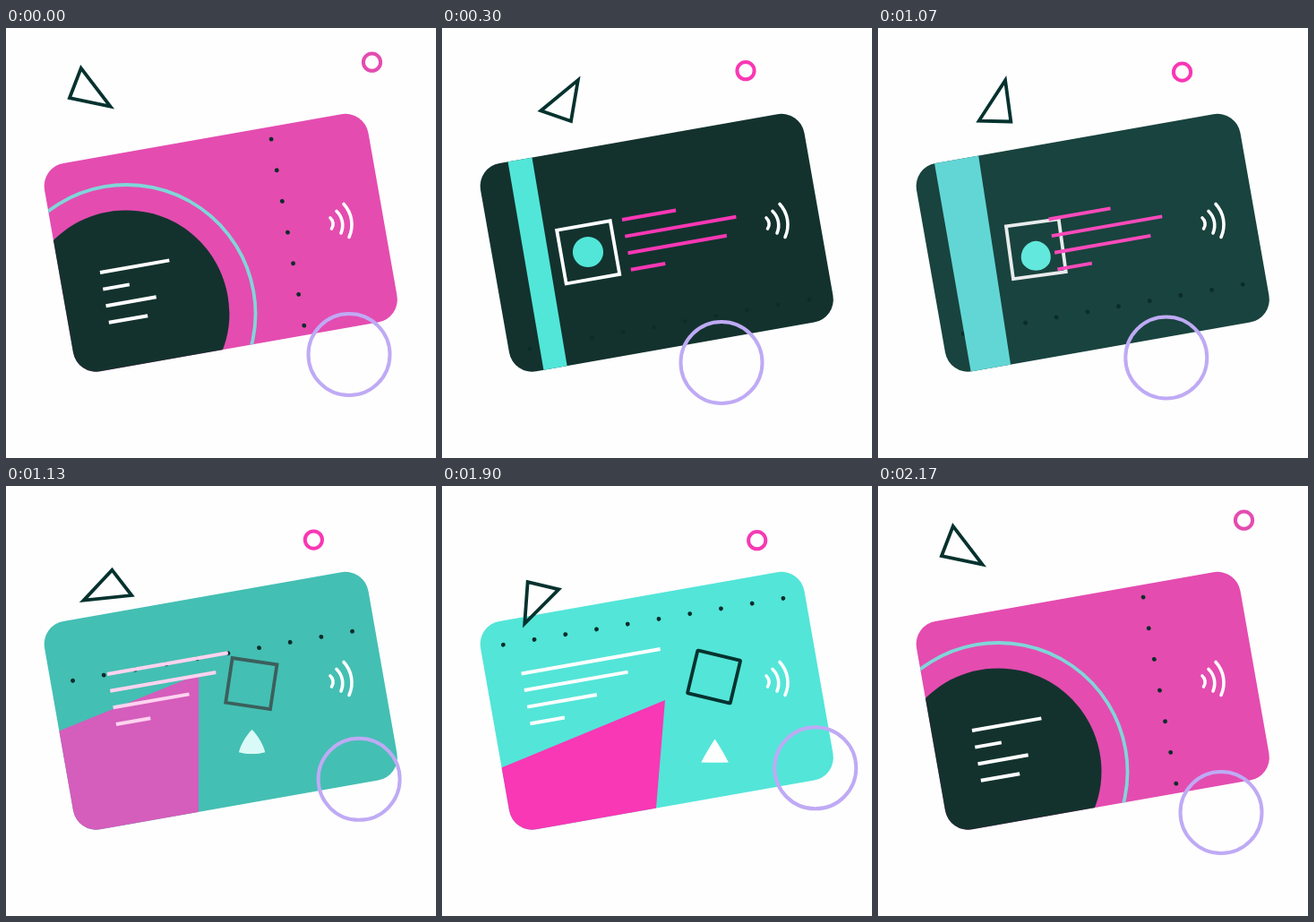
An HTML page with a canvas that plays this animation: 480 by 480 pixels, repeating every 2.76 s.

```html
<!DOCTYPE html>
<html lang="en">
<head>
<meta charset="utf-8">
<title>Card designs</title>
<style>
html, body { margin: 0; width: 100%; height: 100%; overflow: hidden; background: #fefefe; }
canvas { display: block; width: 480px; height: 480px; }
</style>
</head>
<body>
<canvas id="stage" width="480" height="480"></canvas>
<script>
const ctx = document.getElementById('stage').getContext('2d');
const LOOP = 2760, FPS = 30, STEPS = 9;
const TILT = -10 * Math.PI / 180;

const PINK = [249, 55, 180, 1], ROSE = [228, 76, 176, 1], DARK = [19, 50, 46, 1];
const TEAL = [82, 230, 216, 1], WHITE = [255, 255, 255, 1], SKY = [128, 214, 216, 1];
const INK = [4, 50, 46, 1];

// Outline of three curved sides: [corner, handle, handle] per side
const blob = (corners, handles) => corners.map((p, i) => {
  const q = corners[(i + 1) % 3];
  return [p, ...handles(p, q)];
});
const disc = r => blob(
  [[0, -r], [r * 0.866, r / 2], [-r * 0.866, r / 2]],
  (p, q) => [[p[0] - 0.77 * p[1], p[1] + 0.77 * p[0]], [q[0] + 0.77 * q[1], q[1] - 0.77 * q[0]]]);
const wedge = blob(
  [[0, -14], [14.7, 11], [-14.7, 11]],
  (p, q) => [mix(p, q, 1 / 3), mix(p, q, 2 / 3)]);

const slope = [[-10, 346], [249, 239], [234, 420], [20, 460]];
const stripe = [[67, 111], [94, 106], [146, 415], [120, 420]];

const designs = [
  {
    card: ROSE,
    dots: { at: [323.6, 280.1], angle: 80 },
    panel: { points: slope, color: [249, 55, 180, 0] },
    badge: { at: [134.3, 318.5], shape: disc(115), color: DARK },
    frame: { at: [134.5, 319], angle: -10, size: 288, radius: 144, color: SKY },
    lines: { at: [105, 273], lengths: [78.5, 30, 57, 44], color: WHITE },
    triangle: { at: [95.3, 68.7], angle: 11.8 },
    ring: { at: [408.5, 38.2], color: ROSE },
    hoop: [383, 364.5]
  },
  {
    card: DARK,
    dots: { at: [254, 330.5], angle: -10 },
    panel: { points: stripe, color: TEAL },
    badge: { at: [163, 250], shape: disc(17), color: TEAL },
    frame: { at: [163.2, 250.3], angle: -10, size: 60.5, radius: 0, color: WHITE },
    lines: { at: [201, 214], lengths: [61, 126, 112, 39], color: PINK },
    triangle: { at: [133.8, 80], angle: -80.3 },
    ring: { at: [339, 47.7], color: PINK },
    hoop: [312, 373.5]
  },
  {
    card: TEAL,
    dots: { at: [224, 150.5], angle: -10 },
    panel: { points: slope, color: PINK },
    badge: { at: [305.7, 297], shape: wedge, color: WHITE },
    frame: { at: [304.7, 212.3], angle: 13.7, size: 47.5, radius: 0, color: INK },
    lines: { at: [88.5, 209], lengths: [158, 118, 79, 39], color: WHITE },
    triangle: { at: [108.2, 130.4], angle: -267.7 },
    ring: { at: [344.6, 63.5], color: PINK },
    hoop: [417, 314.5]
  }
];
const starts = [0, 29, 56];

// Blends numbers, arrays and objects alike
function mix(a, b, p) {
  if (typeof a === 'number') return a + (b - a) * p;
  if (Array.isArray(a)) return a.map((v, i) => mix(v, b[i], p));
  return Object.fromEntries(Object.keys(a).map(k => [k, mix(a[k], b[k], p)]));
}

function ease(x) {
  const bezier = (u, a, b) => 3 * u * (1 - u) ** 2 * a + 3 * u * u * (1 - u) * b + u ** 3;
  let lo = 0, hi = 1;
  for (let i = 0; i < 30; i++) {
    const mid = (lo + hi) / 2;
    if (bezier(mid, 0.85, 0.12) < x) lo = mid; else hi = mid;
  }
  return bezier(lo, 0, 1);
}

const css = c => `rgba(${c.slice(0, 3).map(Math.round)},${c[3]})`;

function fill(path, color) {
  ctx.fillStyle = css(color);
  ctx.fill(path);
}

function stroke(path, color, width = 4) {
  ctx.strokeStyle = css(color);
  ctx.lineWidth = width;
  ctx.stroke(path);
}

function place(at, angle, draw) {
  ctx.save();
  ctx.translate(...at);
  ctx.rotate(angle);
  draw();
  ctx.restore();
}

const rad = deg => deg * Math.PI / 180;

function polygon(points) {
  const path = new Path2D();
  points.forEach(p => path.lineTo(...p));
  path.closePath();
  return path;
}

function circle(x, y, r) {
  const path = new Path2D();
  path.arc(x, y, r, 0, 2 * Math.PI);
  return path;
}

function box(w, h, r) {
  const path = new Path2D();
  path.roundRect(-w / 2, -h / 2, w, h, r);
  return path;
}

const waves = new Path2D('M362 212A9 9 0 0 1 363.5 224M369 204.5A22 22 0 0 1 374 229M377 196.5A34 34 0 0 1 383 233.5');
const outline = polygon([[-21.9, 14.1], [-16.2, -21.1], [24.6, 14.1]]);
const cardShape = box(367, 236, 26);

function drawCard(s) {
  fill(cardShape, s.card);
  ctx.clip(cardShape);
  ctx.rotate(-TILT);
  ctx.translate(-239.75, -239.75);

  place(s.dots.at, rad(s.dots.angle), () => {
    for (let i = 0; i < 10; i++) fill(circle((i - 4.5) * 35.2, 0, 2.4), [10, 45, 42, 1]);
  });
  fill(polygon(s.panel.points), s.panel.color);

  place(s.badge.at, 0, () => {
    const path = new Path2D(), sides = s.badge.shape;
    path.moveTo(...sides[0][0]);
    sides.forEach(([, a, b], i) => path.bezierCurveTo(...a, ...b, ...sides[(i + 1) % 3][0]));
    fill(path, s.badge.color);
  });

  const f = s.frame;
  place(f.at, rad(f.angle), () => stroke(box(f.size, f.size, f.radius), f.color, 3.8));

  place(s.lines.at, TILT, () => {
    s.lines.lengths.forEach((len, i) => {
      const path = new Path2D();
      path.rect(0, i * 18.9 - 2, len, 4);
      fill(path, s.lines.color);
    });
  });

  ctx.lineCap = 'round';
  stroke(waves, WHITE, 3.6);
}

function render(time) {
  const tick = Math.floor((time % LOOP + 5) * FPS / 1000);
  const i = starts.findLastIndex(n => tick >= n);
  const p = Math.min(1, (tick - starts[i]) / STEPS);
  const from = designs[i], to = designs[(i + 1) % 3];
  const s = mix(from, to, ease(p));
  // The small ring returns to its first place at a steady pace
  if (i === 2) s.ring = mix(from.ring, to.ring, p);

  ctx.fillStyle = '#fefefe';
  ctx.fillRect(0, 0, 480, 480);
  place([239.75, 239.75], TILT, () => drawCard(s));
  place(s.triangle.at, rad(s.triangle.angle), () => stroke(outline, INK, 3.8));
  stroke(circle(...s.ring.at, 9.6), s.ring.color);
  stroke(circle(...s.hoop, 45.5), [191, 170, 245, 1]);
}

let begin;
function loop(now) {
  begin ??= now;
  render(now - begin);
  requestAnimationFrame(loop);
}
render(0);
requestAnimationFrame(loop);
</script>
</body>
</html>
```
